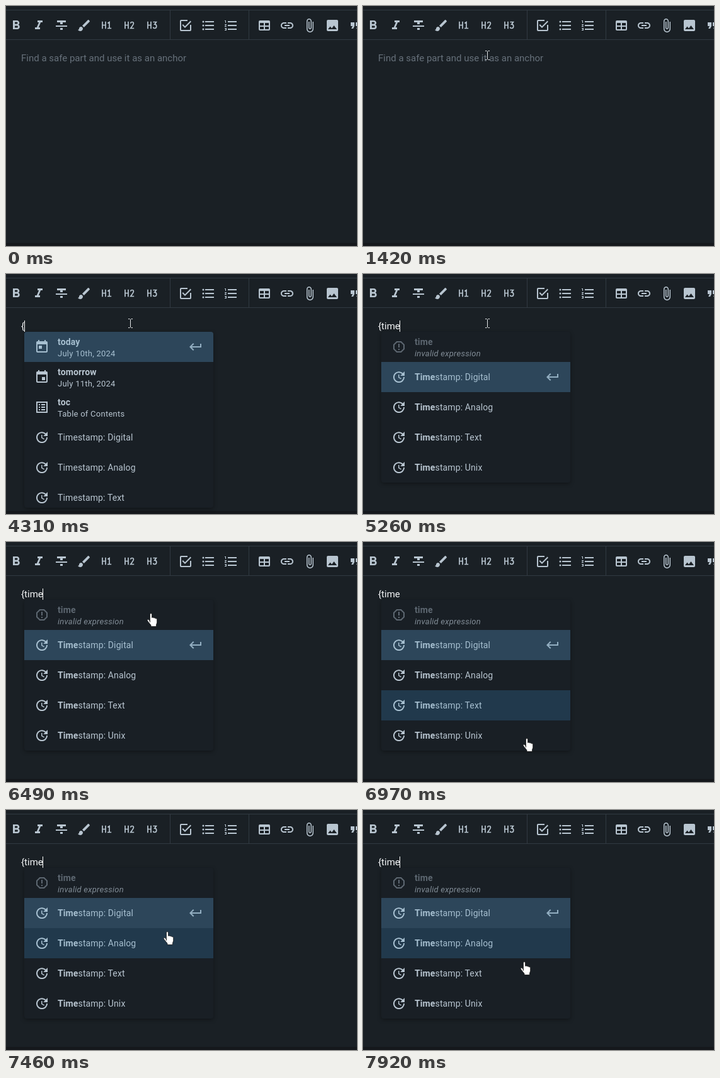
These frames come from a looping animation (557 px wide and 382 px high, 7.99 s). An HTML page:

```html
<!DOCTYPE html>
<html lang="en">
<head>
<meta charset="utf-8">
<title>Editor expression menu</title>
<style>
  html, body { margin: 0; width: 100%; height: 100%; overflow: hidden; background: #1a2025; }
  svg { display: block; font-family: Roboto, Arial, sans-serif; font-size: 14px; letter-spacing: .12px; }
  .body { font-size: 15px; letter-spacing: 0; }
  .sub { font-size: 13px; letter-spacing: .25px; }
  .b { font-weight: 700; }
  .menu { filter: drop-shadow(0 2px 3px rgba(0, 0, 0, .35)); }
</style>
</head>
<body>
<svg id="stage" width="557" height="382" viewBox="0 0 557 382">
  <rect width="557" height="382" fill="#1a2025"/>
  <path d="M0 6.5H557M0 53.5H557M260.5 7V53M385.5 7V53" stroke="#313a42"/>
  <rect y="377" width="557" height="5" fill="#15181c"/>
  <g id="tools" fill="#b8c5d0"></g>
  <text id="line" class="body" x="24" y="88"></text>
  <g id="menu"></g>
  <rect id="caret" y="74" width="1" height="18" fill="#fff"/>
  <path id="beam" d="M-3 -6.5H-.5M1.5 -6.5H4M.5 -6V7M-3 7.5H-.5M1.5 7.5H4" fill="none" stroke="#e4e7e9"/>
  <path id="hand" d="M-1.6 14.5V2.2a1.6 1.6 0 0 1 3.2 0V7.5c.6-.8 2.6-.6 3 .5.8-.6 2.5-.2 2.7.9 1-.5 2.4.1 2.4 1.6v4c0 2.2-1.3 3.2-1.3 5V21.5H0V19.5C-1.2 17.5-4 14.8-5.6 12.2-6.4 10.7-4.6 9.6-3.4 10.8L-1.6 12.8z" fill="#fff" stroke="#111" stroke-width=".8"/>
</svg>
<script>
const LOOP = 7990, ROW = 48, TOP = 92, LEFT = 29, WIDTH = 300, MAX_H = 280;
const $ = id => document.getElementById(id);

const ICONS = {
  bold: "M15.6 10.79c.97-.67 1.65-1.77 1.65-2.79 0-2.26-1.75-4-4-4H7v14h7.04c2.09 0 3.71-1.7 3.71-3.79 0-1.52-.86-2.82-2.15-3.42zM10 6.5h3c.83 0 1.5.67 1.5 1.5s-.67 1.5-1.5 1.5h-3v-3zm3.5 9H10v-3h3.5c.83 0 1.5.67 1.5 1.5s-.67 1.5-1.5 1.5z",
  italic: "M10 4v3h2.21l-3.42 8H6v3h8v-3h-2.21l3.42-8H18V4z",
  strike: "M10 19h4v-3h-4v3zM5 4v3h5v3h4V7h5V4H5zM3 14h18v-2H3v2z",
  brush: "M7 14c-1.66 0-3 1.34-3 3 0 1.31-1.16 2-2 2 .92 1.22 2.49 2 4 2 2.21 0 4-1.79 4-4 0-1.66-1.34-3-3-3zm13.71-9.37l-1.34-1.34c-.39-.39-1.02-.39-1.41 0L9 12.25 11.75 15l8.96-8.96c.39-.39.39-1.02 0-1.41z",
  check: "M19 19H5V5H15V3H5C3.89 3 3 3.89 3 5V19A2 2 0 0 0 5 21H19A2 2 0 0 0 21 19V11H19M7.91 10.08L6.5 11.5L11 16L21 6L19.59 4.58L11 13.17Z",
  bullets: "M2.5 6a1.5 1.5 0 1 0 3 0a1.5 1.5 0 1 0-3 0M2.5 12a1.5 1.5 0 1 0 3 0a1.5 1.5 0 1 0-3 0M2.5 18a1.5 1.5 0 1 0 3 0a1.5 1.5 0 1 0-3 0M7 19h14v-2H7zM7 13h14v-2H7zM7 5v2h14V5z",
  numbers: "M2 17h2v.5H3v1h1v.5H2v1h3v-4H2v1zm1-9h1V4H2v1h1v3zm-1 3h1.8L2 13.1v.9h3v-1H3.2L5 10.9V10H2v1zm5-6v2h14V5H7zm0 14h14v-2H7v2zm0-6h14v-2H7v2z",
  table: "M5 4H19A2 2 0 0 1 21 6V18A2 2 0 0 1 19 20H5A2 2 0 0 1 3 18V6A2 2 0 0 1 5 4M5 8V12H11V8H5M13 8V12H19V8H13M5 14V18H11V14H5M13 14V18H19V14H13Z",
  link: "M3.9 12c0-1.71 1.39-3.1 3.1-3.1h4V7H7c-2.76 0-5 2.24-5 5s2.24 5 5 5h4v-1.9H7c-1.71 0-3.1-1.39-3.1-3.1zM8 13h8v-2H8v2zm9-6h-4v1.9h4c1.71 0 3.1 1.39 3.1 3.1s-1.39 3.1-3.1 3.1h-4V17h4c2.76 0 5-2.24 5-5s-2.24-5-5-5z",
  clip: "M16.5 6v11.5c0 2.21-1.79 4-4 4s-4-1.79-4-4V5c0-1.38 1.12-2.5 2.5-2.5s2.5 1.12 2.5 2.5v10.5c0 .55-.45 1-1 1s-1-.45-1-1V6H10v9.5c0 1.38 1.12 2.5 2.5 2.5s2.5-1.12 2.5-2.5V5c0-2.21-1.79-4-4-4S7 2.79 7 5v12.5c0 3.04 2.46 5.5 5.5 5.5s5.5-2.46 5.5-5.5V6h-1.5z",
  image: "M21 19V5c0-1.1-.9-2-2-2H5c-1.1 0-2 .9-2 2v14c0 1.1.9 2 2 2h14c1.1 0 2-.9 2-2zM8.5 13.5l2.5 3.01L14.5 12l4.5 6H5l3.5-4.5z",
  quote: "M6 17h3l2-4V7H5v6h3zm8 0h3l2-4V7h-6v6h3z",
  today: "M19 3h-1V1h-2v2H8V1H6v2H5c-1.1 0-2 .9-2 2V19c0 1.1.9 2 2 2h14c1.1 0 2-.9 2-2V5c0-1.1-.9-2-2-2zm0 16H5V8h14v11zM7 10h5v5H7z",
  event: "M19 3h-1V1h-2v2H8V1H6v2H5c-1.1 0-2 .9-2 2V19c0 1.1.9 2 2 2h14c1.1 0 2-.9 2-2V5c0-1.1-.9-2-2-2zm0 16H5V8h14v11zM12 12h5v5h-5z",
  list: "M3 3H21V21H3ZM5 5V19H19V5ZM11 7h6v2h-6zM11 11h6v2h-6zM11 15h6v2h-6zM7 7h2v2H7zM7 11h2v2H7zM7 15h2v2H7z",
  alert: "M8.27 3L3 8.27V15.73L8.27 21H15.73L21 15.73V8.27L15.73 3M9.1 5H14.9L19 9.1V14.9L14.9 19H9.1L5 14.9V9.1M11 15H13V17H11V15M11 7H13V13H11V7",
  update: "M21 10.12h-6.78l2.74-2.82c-2.73-2.7-7.15-2.8-9.88-.1-2.73 2.71-2.73 7.08 0 9.79s7.15 2.71 9.88 0C18.32 15.65 19 14.08 19 12.1h2c0 1.98-.88 4.55-2.64 6.29-3.51 3.48-9.21 3.48-12.72 0-3.5-3.47-3.53-9.11-.02-12.58s9.14-3.47 12.65 0L21 3v7.12zM12.5 8v4.25l3.5 2.08-.72 1.21L11 13V8h1.5z",
  enter: "M19 7v4H5.83l3.58-3.59L8 6l-6 6 6 6 1.41-1.41L5.83 13H21V7z"
};

const icon = (name, cx, cy, fill = "inherit") =>
  `<path d="${ICONS[name]}" transform="translate(${cx - 12} ${cy - 12})" fill="${fill}" fill-rule="evenodd"/>`;

const text = (x, y, fill, body, attrs = "") =>
  `<text x="${x}" y="${y}" fill="${fill}" ${attrs}>${body}</text>`;

// Toolbar
const DIGITS = [
  "M1.4-3L4-4.8V5M1 5H7.2",
  "M1.8-2.8Q1.8-5 4.1-5T6.4-2.7Q6.4-1.2 1.8 5H7.2",
  "M1.4-5H6.4L3.8-1.3Q6.8-1.2 6.8 1.8T4 5Q1.8 5 1.5 3.2"
];
const heading = (digit, i) =>
  `<path d="M-7-5.8V5.8M-2-5.8V5.8M-7 0H-2${digit}" transform="translate(${160 + 36 * i} 30.5)" fill="none" stroke="#b8c5d0" stroke-width="1.7"/>`;
const group = (x, names) => names.map((n, i) => icon(n, x + 36 * i, 31)).join("");

$("tools").innerHTML = group(16, ["bold", "italic", "strike", "brush"])
  + DIGITS.map(heading).join("")
  + group(285, ["check", "bullets", "numbers"])
  + group(410, ["table", "link", "clip", "image", "quote"]);

// Menu
const BUILT_IN = [
  { icon: "today", title: "today", sub: "July 10th, 2024" },
  { icon: "event", title: "tomorrow", sub: "July 11th, 2024" },
  { icon: "list", title: "toc", sub: "Table of Contents" }
];
const STAMPS = ["Digital", "Analog", "Text", "Unix"].map(kind => ({ icon: "update", label: "Timestamp: " + kind }));

function menuItems(typed, t) {
  if (typed.length > 1) return [{ icon: "alert", title: typed, sub: "invalid expression", off: true }, ...STAMPS];
  return t < 3310 ? BUILT_IN : [...BUILT_IN, ...STAMPS];
}

function drawRow(item, i, typed, active, hover) {
  const y = TOP + i * ROW, lit = active || hover;
  const tone = item.off ? "#5d6771" : lit ? "#a6bfd0" : "#b8c5d0";
  let out = lit ? `<rect x="${LEFT}" y="${y}" width="${WIDTH}" height="${ROW}" fill="${active ? "#2d465a" : "#21394c"}"/>` : "";
  out += icon(item.icon, 57, y + 24, tone);
  if (item.label) {
    const n = typed.length;
    out += text(82, y + 29, tone, `<tspan class="b">${item.label.slice(0, n)}</tspan>${item.label.slice(n)}`);
  } else {
    out += text(82, y + 21, tone, item.title, 'class="b"');
    out += text(82, y + 39, item.off ? "#818c96" : tone, item.sub, `class="sub"${item.off ? ' font-style="italic"' : ""}`);
  }
  return active ? out + icon("enter", 301, y + 24, "#93afc2") : out;
}

function drawMenu(items, typed, hover) {
  const h = Math.min(items.length * ROW, MAX_H);
  const active = items[0].off ? 1 : 0;
  const box = `x="${LEFT}" y="${TOP}" width="${WIDTH}" height="${h}" rx="4"`;
  return `<clipPath id="clip"><rect ${box}/></clipPath><rect ${box} class="menu" fill="#191f25"/>`
    + `<g clip-path="url(#clip)">${items.map((item, i) => drawRow(item, i, typed, i === active, i === hover)).join("")}</g>`;
}

// Pointer samples: [time, x, y]
const track = [];
const addPoints = (start, step, points) => points.forEach(([x, y], i) => track.push([start + i * step, x, y]));
const glide = (n, [x0, y0], [x1, y1], ease) => Array.from({ length: n }, (_, i) => {
  const k = ease((i + 1) / n);
  return [Math.round(x0 + (x1 - x0) * k), Math.round(y0 + (y1 - y0) * k)];
});
const easeOut = k => 1 - (1 - k) ** 2;
const easeInOut = k => k * k * (3 - 2 * k);

addPoints(460, 68, glide(12, [510, 386], [203, 82], easeOut));
addPoints(1280, 70, [[200, 80], [198, 79], [197, 78]]);
addPoints(6350, 68, glide(6, [197, 78], [263, 148], easeInOut));
addPoints(6830, 70, [[263, 188], [262, 250], [260, 312], [260, 324], [259, 312], [258, 279],
  [258, 248], [257, 222], [257, 205], [256, 193], [256, 190], [256, 192]]);
addPoints(7660, 65, [[256, 198], [256, 206], [256, 216], [256, 227], [256, 241]]);

// Typing and caret
const KEYS = [[3250, "{"], [4720, "{t"], [4850, "{ti"], [5120, "{tim"], [5260, "{time"]];
const CARET = [[1760, 2290], [2830, 3780], [4310, 5860], [6390, 6920], [7450, 7980]];
const lastIndex = (list, t) => list.findLastIndex(e => e[0] <= t + .01);

let shown = "";

function render(t) {
  const key = lastIndex(KEYS, t), at = lastIndex(track, t);
  const typed = key < 0 ? "" : KEYS[key][1];
  const line = $("line");

  // The row highlight trails the pointer by one sample.
  const before = track[at - 1];
  const hover = t >= 6690 && before ? Math.floor((before[2] - TOP) / ROW) : -1;
  const items = typed ? menuItems(typed.slice(1), t) : [];
  const state = [typed, items.length, hover].join();
  if (state !== shown) {
    shown = state;
    line.textContent = typed || "Find a safe part and use it as an anchor";
    line.setAttribute("fill", typed ? "#f4f6f7" : "#66707a");
    $("menu").innerHTML = typed ? drawMenu(items, typed.slice(1), hover) : "";
  }

  const on = CARET.some(([a, b]) => t >= a && t < b);
  $("caret").style.display = on ? "" : "none";
  $("caret").setAttribute("x", typed ? Math.floor(24 + line.getComputedTextLength()) : 24);

  const [, x, y] = track[at] || [0, 0, 0];
  const overMenu = typed && y >= TOP;
  for (const [id, visible] of [["beam", at >= 0 && !overMenu], ["hand", at >= 0 && overMenu]]) {
    $(id).style.display = visible ? "" : "none";
    $(id).setAttribute("transform", `translate(${x} ${y})`);
  }
}

const start = performance.now();
function tick() {
  render((performance.now() - start) % LOOP);
  requestAnimationFrame(tick);
}
tick();
</script>
</body>
</html>
```
